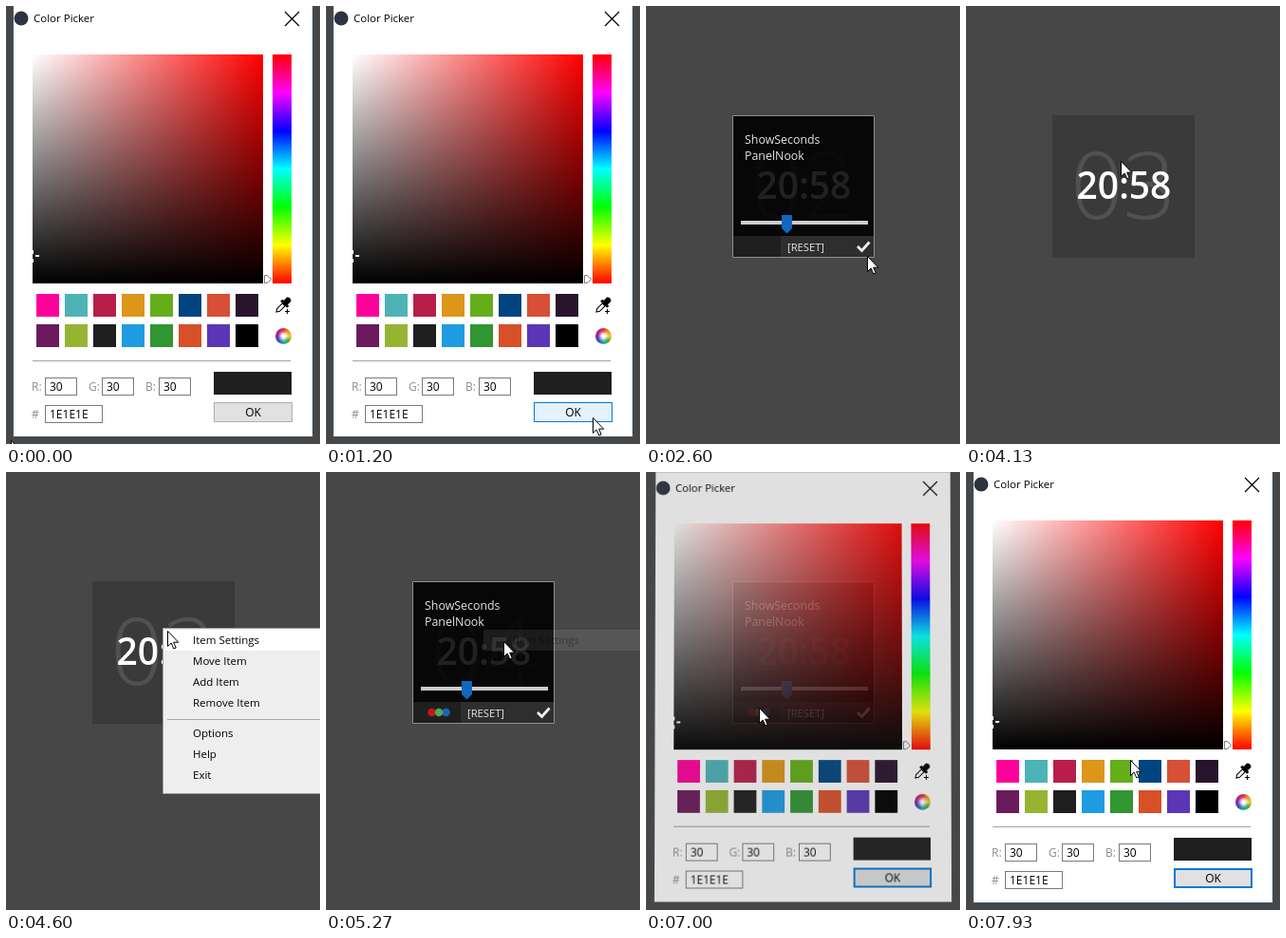
An HTML page for the animation above (8 s loop, 331x461 px).

```html
<!DOCTYPE html>
<html lang="en">
<head>
<meta charset="utf-8">
<title>Clock tile settings</title>
<style>
  html, body { margin: 0; width: 331px; height: 461px; overflow: hidden; background: #474747; }
  svg, #picker { position: absolute; left: 0; top: 0; width: 331px; height: 461px; overflow: visible; }
  #picker { transform-origin: 165px 225px; }
  #wheel {
    position: absolute; left: 284px; top: 339px; width: 17px; height: 17px; border-radius: 50%;
    background: radial-gradient(#fff 12%, #fff0 50%),
      conic-gradient(#d33, #e93, #ec3, #4a4, #2aa, #35b, #82b, #b27, #d33);
  }
  text { font: 12px "Open Sans", sans-serif; }
  .title { font-size: 11.5px; }
  .label { fill: #8c8c8c; }
  .panel { font-size: 12.4px; fill: #e6e6e6; }
  #seconds { font-size: 97px; font-weight: 300; fill: #515151; text-anchor: middle; }
  #clock { font-size: 39px; font-weight: 600; fill: #fff; text-anchor: middle; }
</style>
</head>
<body>
<svg>
  <path fill="#3a3a3a" d="M91 115h150v150H91z"/>
  <text id="seconds" x="165.500" y="224">01</text>
  <text id="clock" x="166.500" y="203">20:58</text>
  <g id="settings">
    <path fill="#000" fill-opacity=".87" d="M91 115h150v150H91z"/>
    <path fill="#2e2e2e" d="M142 242h98v22h-98z"/>
    <path fill="#1f1f1f" d="M92 242h50v22H92z"/>
    <path fill="none" stroke="#8e8e8e" d="M91.500 115.500h149v149h-149z"/>
    <text class="panel" x="104" y="145">ShowSeconds</text>
    <text class="panel" x="104" y="162">PanelNook</text>
    <path fill="#ccc" d="M100 226h134v4H100z"/>
    <path fill="#1068c0" d="M143 220h11v14l-5.500 5.500-5.500-5.500z"/>
    <g id="dots">
      <circle cx="111.500" cy="253" r="4.300" fill="#c81414"/>
      <circle cx="126.500" cy="253" r="4.300" fill="#1e64b4"/>
      <circle cx="119" cy="253" r="4.300" fill="#50a850"/>
    </g>
    <text class="panel" x="149" y="258" style="font-size:11.2px">[RESET]</text>
    <path fill="none" stroke="#eee" stroke-width="2.800" d="M223 253l4.500 4.500 8-9"/>
  </g>
</svg>

<div id="picker">
  <svg>
    <defs>
      <linearGradient id="sat"><stop stop-color="#fff"/><stop offset="1" stop-color="red"/></linearGradient>
      <linearGradient id="dark" x2="0" y2="1"><stop stop-opacity="0"/><stop offset="1"/></linearGradient>
      <linearGradient id="hue" x2="0" y2="1"></linearGradient>
    </defs>
    <path fill="#fff" stroke="#3c5468" d="M7.500-4.500h316v458h-316z"/>
    <circle cx="16" cy="13" r="7.500" fill="#2b3340"/>
    <text class="title" x="29" y="17">Color Picker</text>
    <path stroke="#000" stroke-width="1.200" d="M294 6l15 15m0-15l-15 15"/>
    <path fill="url(#sat)" d="M28 51h243v241H28z"/>
    <path fill="url(#dark)" d="M28 51h243v241H28z"/>
    <path fill="url(#hue)" d="M281 51h20v241h-20z"/>
    <path stroke="#fff" stroke-width="2" d="M28 257v4m0 5v4m3-7h4"/>
    <path fill="#fff" stroke="#777" d="M272.500 283.500h3l4 4-4 4h-3z"/>
    <g id="swatches"></g>
    <g transform="translate(292 315) rotate(45)">
      <path d="M-3-9q3-3 6 0v5h2v3H-5v-3h2z"/>
      <path fill="#fff" stroke="#000" d="M-2-1h4v8l-2 3-2-3z"/>
    </g>
    <path stroke="#000" d="M294 321.500h5m-2.500-2.500v5"/>
    <path stroke="#a0a0a0" d="M28 373.500h272"/>
    <g id="fields"></g>
    <path fill="#1e1e1e" d="M219 385h82v24h-82z"/>
    <rect id="ok"/>
    <text x="260.500" y="432" text-anchor="middle">OK</text>
  </svg>
  <div id="wheel"></div>
</div>

<svg>
  <g id="menu">
    <path fill="#eee" stroke="#a0a0a0" d="M165.500 164.500h180v174h-180z"/>
    <path stroke="#aaa" d="M170 260.500h161"/>
    <g id="entries"></g>
  </g>
  <path id="hover" fill="#fff" d="M166 166h170v22H166z"/>
  <text id="hoverText" class="title" x="197" y="181">Item Settings</text>
  <path id="cursor" fill="#fff" stroke="#000" d="M.500.500v16l3.700-3.500 2.600 6 2.400-1-2.500-5.800h5z"/>
</svg>

<script>
const LOOP = 8000, STEP = 1000 / 15;
const $ = id => document.getElementById(id);
const clamp = v => Math.min(1, Math.max(0, v));
const ramp = (t, from, to) => clamp((t - from) / (to - from));
const smooth = k => k * k * (3 - 2 * k);
const setAttrs = (el, attrs) => { for (const key in attrs) el.setAttribute(key, attrs[key]); };

$('hue').innerHTML = ['red', '#f0f', '#00f', '#0ff', '#0f0', '#ff0', 'red']
  .map((c, i) => `<stop offset="${i / 6}" stop-color="${c}"/>`).join('');

$('swatches').innerHTML = [
  '#ff009b', '#4db3b7', '#b91e4b', '#dc9619', '#64af19', '#004480', '#d74f37', '#28142d',
  '#6b1a5c', '#96b432', '#1e1e1e', '#1e9be1', '#309632', '#d75028', '#5b37b7', '#000'
].map((c, i) =>
  `<rect x="${32 + i % 8 * 30}" y="${i < 8 ? 303 : 335}" width="24" height="24" fill="${c}"/>`).join('');

const field = (label, value, x, y, width) => `
  <text class="label" x="${x - 14}" y="${y + 14}">${label}</text>
  <rect x="${x + .5}" y="${y + .5}" width="${width}" height="18" fill="#fff" stroke="#7a7a7a"/>
  <text x="${x + 5}" y="${y + 14}">${value}</text>`;
$('fields').innerHTML = field('R:', '30', 41, 391, 33) + field('G:', '30', 101, 391, 33) +
  field('B:', '30', 161, 391, 33) + field('#', '1E1E1E', 41, 420, 60);

$('entries').innerHTML = ['Item Settings', 'Move Item', 'Add Item', 'Remove Item', 'Options', 'Help', 'Exit']
  .map((s, i) => `<text class="title" x="197" y="${181 + i * 22 + (i > 3 ? 10 : 0)}">${s}</text>`).join('');

// time, x, y of the pointer tip
const path = [
  [70, 5, 457], [870, 281, 433], [1730, 281, 433], [2270, 233, 263], [2670, 233, 263],
  [2930, 255, 304], [3070, 255, 304], [3530, 205, 225], [3670, 205, 225], [4070, 163, 163],
  [4530, 163, 163], [4730, 187, 178], [5470, 187, 178], [6070, 113, 253], [6720, 113, 253],
  [6721, 119, 248], [7400, 119, 248], [7930, 173, 303]
];
function pointer(t) {
  const i = path.findIndex(p => p[0] > t);
  if (i === 0) return path[0].slice(1);
  if (i < 0) return path[path.length - 1].slice(1);
  const [a, b] = [path[i - 1], path[i]];
  const k = smooth(ramp(t, a[0], b[0]));
  return [a[1] + (b[1] - a[1]) * k, a[2] + (b[2] - a[2]) * k];
}

function drawPicker(t) {
  const opening = t > 4000;
  const away = opening ? (1 - ramp(t, 6810, 7130)) ** 2 : ramp(t, 1330, 1510);
  $('picker').style.opacity = 1 - away;
  $('picker').style.transform = away === 0 ? 'none' :
    `translateY(${5 * away}px) perspective(1000px) rotateX(${6.8 * away}deg) scale(${1 - .062 * away})`;

  const hot = !opening && t > 790, inset = opening ? 1 : .5;
  setAttrs($('ok'), {
    x: 219 + inset, y: 417 + inset, width: 83 - 2 * inset, height: 21 - 2 * inset,
    fill: hot ? '#e5f1fb' : '#e1e1e1',
    stroke: opening || hot ? '#0078d7' : '#adadad',
    'stroke-width': 2 * inset
  });
}

function drawMenu(t) {
  const closed = t >= 4990, left = 1 - ramp(t, 5000, 5330);
  $('menu').style.opacity = closed ? 0 : ramp(t, 4200, 4460);
  $('hover').style.opacity = t < 4590 ? 0 : closed ? left ** 1.5 : 1;
  $('hoverText').style.opacity = t < 4590 ? 0 : closed ? Math.sqrt(left) * .8 : 1;
}

function draw(t) {
  $('seconds').textContent = t < 1900 ? '01' : t < 3300 ? '02' : t < 4660 ? '03' : t < 5700 ? '04' : '06';
  $('settings').style.opacity = t < 4000 ? 1 - ramp(t, 2670, 2930) : ramp(t, 4990, 5200);
  $('dots').style.opacity = t < 4000 ? 0 : 1;
  drawPicker(t);
  drawMenu(t);
  $('cursor').setAttribute('transform', `translate(${pointer(t).map(Math.round)})`);
}

function tick() {
  const t = performance.now() % LOOP;
  draw(Math.floor((t + 10) / STEP) * STEP % LOOP);
  requestAnimationFrame(tick);
}
tick();
</script>
</body>
</html>
```
